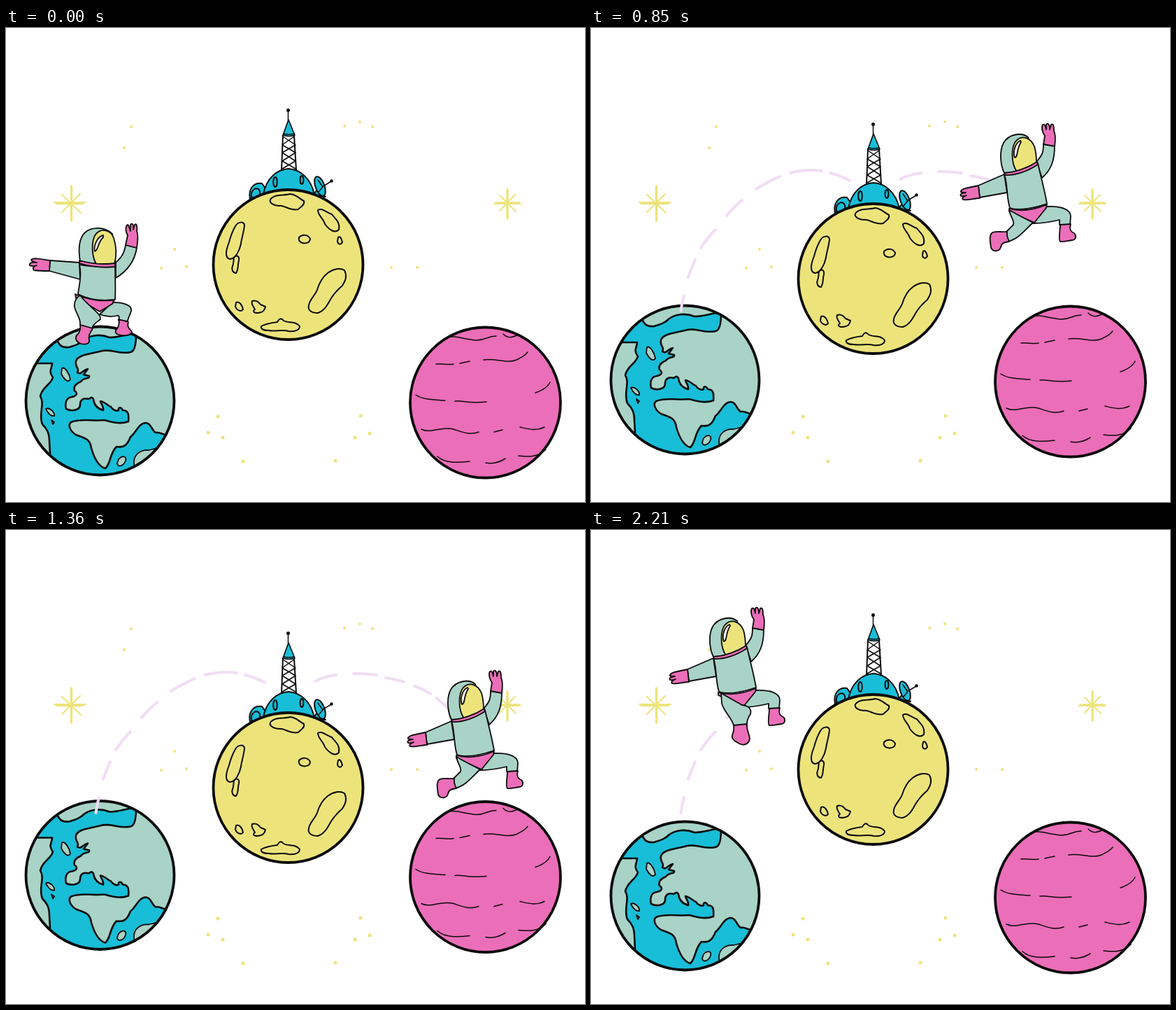
Write an HTML page that moves like this. It is 828 by 677 pixels and loops after 2.38 s.

```html
<!DOCTYPE html>
<html lang="en">
<head>
<meta charset="utf-8">
<title>Planet hopping</title>
<style>
  html, body { margin: 0; width: 100%; height: 100%; overflow: hidden; background: #fff; }
  svg {
    display: block; width: 828px; height: 677px;
    stroke: #0b0b0b; stroke-width: 2; stroke-linejoin: round; stroke-linecap: round;
  }
  .globe { stroke-width: 3.8; }
  .suit { fill: #a9d3c7; }
  .pink { fill: #eb6eb8; }
  .sun { fill: #ece47b; }
  .blue { fill: #18bdd7; }
  .white { fill: #fbf3fb; }
  .line { fill: none; }
  .thin { fill: none; stroke-width: 1.5; }
  #stars { stroke: #ece47b; fill: none; }
  #trail { stroke: #f1ddf4; stroke-width: 4; fill: none; }
  #land { stroke-width: 2.6; }
  #hero { stroke-width: 1.8; }
</style>
</head>
<body>
<svg viewBox="0 0 828 677">
  <defs><clipPath id="disc"><circle cx="134.5" cy="532.5" r="106"/></clipPath></defs>

  <g id="stars">
    <path stroke-width="3.4" d="M93.500 226V275M72 250.500H110"/>
    <path stroke-width="2" d="M80 238L107 264M106 237L80 263M69 249H114"/>
    <path stroke-width="3.4" d="M717 231V272M700 250H734"/>
    <path stroke-width="2" d="M706 239L729 262M728 238L706 261M698 251H736"/>
  </g>

  <g id="earth">
    <circle class="blue" cx="134.5" cy="532.5" r="106"/>
    <g id="land" class="suit" clip-path="url(#disc)">
      <path d="M72 444C76 452 78 457 90 456C100 453 106 451 112 445C122 438 136 437 148 442C160 442 170 438 186 436L150 410L90 420Z"/>
      <path d="M186 438C186 452 184 462 178 463C162 467 150 457 134 462C118 466 102 467 100 476C98 484 106 486 102 492C108 496 110 488 117 487L111 495L119 497C120 502 112 498 107 505C100 508 96 512 98 518C104 522 100 526 94 527C86 528 84 536 86 544C94 548 106 546 106 538C106 530 112 528 118 530C122 528 122 526 125 530C126 540 132 544 139 546C140 540 136 538 135 533C142 534 146 540 150 541C152 545 158 548 161 546C160 541 165 541 167 546C175 546 176 552 175 562C162 567 150 562 140 560C126 562 108 557 93 563C88 567 92 576 100 581C112 586 120 586 122 600C126 614 132 626 142 629C150 622 148 608 158 598C170 600 174 594 178 584C186 578 190 564 200 564C207 564 208 574 214 578C222 576 224 584 236 580L270 500L230 430Z"/>
      <path d="M40 479L66 479C66 486 60 490 67 499C64 510 52 512 49 526C56 536 46 552 52 566C58 572 62 578 62 590L63 608L10 600L10 479Z"/>
      <g stroke-width="1.8">
        <path d="M80 486C84 483 91 494 92 502C88 508 82 500 79 494Z"/>
        <path d="M57 544C62 541 70 549 69 554C64 555 60 550 57 544ZM65 560L69 563L67 566Z"/>
        <path d="M161 616C166 610 173 611 171 618C168 626 160 628 159 622Z"/>
        <path d="M183 622C182 608 194 602 204 603L224 598L215 620L185 640Z"/>
      </g>
    </g>
    <circle class="globe line" cx="134.5" cy="532.5" r="106"/>
  </g>

  <g id="rose">
    <circle class="globe pink" cx="685.5" cy="535" r="107.500"/>
    <path class="thin" d="M628 443C640 438 652 444 673 446C686 446 688 440 701 440M711 437C718 444 724 442 733 438M615 480C625 479 633 482 640 480M649 479L663 476M683 474C700 471 716 480 730 474C738 470 742 468 746 463M757 521C766 518 774 514 778 506M586 524C596 531 612 531 628 532M642 533C652 531 660 537 687 534M594 573C606 580 622 568 640 573C652 577 664 582 676 577M698 577L710 574M735 570C748 573 758 576 770 570M617 612C628 622 646 621 663 619M686 621C696 623 706 620 714 615M733 611C746 612 760 614 772 602"/>
  </g>

  <g id="moon">
    <path fill="#fff" d="M396 153L394 203H415L412 153Z"/>
    <path class="thin" d="M396 155L414 167L395 178L414 190L395 201M412 155L395 167L414 178L395 190L414 201"/>
    <path class="blue" stroke-width="1.6" d="M404 131L396 153Q405 156 413 153ZM397 151Q405 153 412 151"/>
    <path class="thin" d="M403.500 118V132"/>
    <circle cx="403.5" cy="117.500" r="1.500"/>
    <path class="blue" d="M349 244C346 230 354 220 366 222L376 236Z"/>
    <ellipse class="blue" cx="357" cy="237" rx="6" ry="8" transform="rotate(20 357 237)"/>
    <path class="blue" d="M438 240L445 231L457 241Z"/>
    <ellipse class="blue" cx="449" cy="226" rx="6.500" ry="14.500" transform="rotate(-20 449 226)"/>
    <path class="thin" d="M446 217L453 227L447 234M452 227L465 219"/>
    <circle cx="465.500" cy="218.500" r="1.300"/>
    <path class="blue" d="M368 238C372 214 388 202 404 201C420 202 436 214 441 238Z"/>
    <ellipse class="blue" cx="385" cy="220" rx="2.700" ry="7"/>
    <ellipse class="blue" cx="423" cy="217" rx="2.400" ry="6"/>
    <circle class="globe sun" cx="403.5" cy="338" r="107"/>
    <path class="line" d="M378 245C384 236 400 240 406 237C416 238 418 243 426 247C428 253 420 256 418 259C408 262 396 252 390 254C384 254 376 250 378 245ZM446 260C452 256 458 264 466 266C470 272 478 276 476 288C470 294 462 288 456 280C454 272 446 268 446 260ZM419 299C424 294 432 295 435 301C435 307 428 308 424 307C420 306 418 303 419 299ZM475 299C478 296 480 302 481 306C478 311 474 308 474 304Z"/>
    <path class="line" d="M328 283C332 276 341 276 341 282C340 292 337 300 336 308C334 318 328 330 320 330C312 328 315 316 319 306C321 298 324 290 328 283ZM326 328C330 323 334 326 333 332C331 338 333 344 329 350C324 350 322 344 324 340C326 336 325 332 326 328ZM460 350C468 344 478 342 484 346C488 354 486 360 481 368C474 374 470 378 465 386C460 394 456 404 446 407C438 407 431 404 433 396C434 388 442 382 445 374C448 364 452 356 460 350Z"/>
    <path class="line" d="M329 392C334 390 338 396 339 402C336 406 330 403 328 398ZM352 390C358 388 362 392 364 395L371 398C370 403 368 406 360 407C353 407 353 404 356 402C354 398 350 394 352 390ZM365 426C372 422 380 421 388 420C390 416 393 413 397 418C404 422 414 418 420 426C420 432 412 434 404 433C396 430 384 434 376 432C368 432 364 430 365 426Z"/>
  </g>

  <g id="trail"></g>

  <g id="hero">
    <g id="stand">
      <path class="suit" d="M152 392C166 391 181 396 179 404C177 411 174 415 174 419L161 417C163 412 161 410 158 411C150 413 142 412 134 409Z"/>
      <path class="pink" d="M161 416L175 420C172 428 178 430 180 434C179 440 168 440 161 438C155 436 156 432 159 429C162 425 162 420 161 416Z"/>
      <path class="pink" d="M99 380C118 389 140 391 155 388L152 394L134 405L112 392L100 386Z"/>
      <path class="suit" d="M106 382C99 386 96 394 99 402C103 412 107 416 106 424L123 429C124 423 130 420 135 416C137 408 118 398 106 382Z"/>
      <path class="pink" d="M106 424L124 429C120 436 117 440 119 446C120 452 110 453 105 450C98 446 99 440 103 437C106 433 107 429 106 424Z"/>
      <path class="suit" d="M63 332L105 335L106 359L62 347Z"/>
      <path class="pink" d="M63 332C54 331 40 327 36 331C36 334 42 334 44 335C38 334 33 335 34 339C37 341 42 340 44 339C40 340 37 343 40 346C48 347 55 347 62 347Z"/>
      <path class="suit" d="M171 310C169 324 163 329 157 335L157 357C174 347 184 332 187 314Z"/>
      <path class="pink" d="M171 310L174 296C170 290 171 283 174 281C176 281 176 286 178 290L178 281C180 278 183 280 182 288L184 281C187 278 188 284 187 290C190 297 188 306 187 314Z"/>
      <path class="suit" d="M106 333C103 315 105 300 113 292C124 283 142 284 152 294L156 336C138 338 118 336 106 333Z"/>
      <path class="sun" d="M129 337C122 325 122 304 128 295C136 285 150 288 154 300C158 312 158 326 155 337Q143 340 129 337Z"/>
      <path class="white" d="M139 296C130 298 125 312 127 319C132 318 131 306 139 299Z"/>
      <path class="suit" d="M105 338C109 355 104 370 103 380C118 388 138 390 156 388C157 372 156 355 156 340C138 343 118 340 105 338Z"/>
      <path class="pink" d="M105 332C122 337 140 338 156 336L156 341C138 343 118 340 105 336Z"/>
    </g>
    <g id="leap">
      <path class="suit" d="M418 198C438 197 452 202 452 212L451 224L436 224L436 217C424 220 412 222 398 222Z"/>
      <path class="pink" d="M437 224L452 223C450 231 452 234 457 236C461 240 459 246 454 246C447 247 441 249 437 248C434 246 437 232 437 224Z"/>
      <path class="pink" d="M364 201C383 206 402 202 418 195L417 200L400 221Q380 212 364 205Z"/>
      <g id="jump">
        <path class="suit" d="M368 202L398 219C407 220 412 224 410 232C405 239 405 243 405 248L386 248C384 238 370 226 369 216Z"/>
        <path class="pink" d="M386 248L405 246C404 254 409 262 409 267C408 274 402 277 396 275C390 272 382 268 384 262C386 257 387 253 386 248Z"/>
      </g>
      <g id="sit">
        <path class="suit" d="M364 206C380 208 402 206 412 211C418 216 417 224 416 233L401 236C400 232 376 231 370 224C366 217 366 211 364 206Z"/>
        <path class="pink" d="M401 236L417 233C415 242 419 246 428 250C433 255 429 259 422 258C414 260 406 258 404 252C405 246 402 242 401 236Z"/>
      </g>
      <g id="run">
        <path class="suit" d="M364 203C366 214 372 218 370 224L360 234L362 248C378 244 386 232 398 221Q380 212 364 203Z"/>
        <path class="pink" d="M361 234C352 235 344 232 339 236C335 240 337 248 338 257C342 264 350 262 352 256C353 250 357 249 364 248Q360 240 361 234Z"/>
      </g>
      <path class="suit" d="M320 168L357 152L361 178L322 185Z"/>
      <path class="pink" d="M320 168L306 171C300 172 296 174 295 176C294 178 297 178 302 178C296 179 293 180 295 183C297 184 300 183 303 182C298 184 296 186 298 188C304 190 315 186 322 186Z"/>
      <path class="suit" d="M413 109C413 120 412 124 403 134L411 157C424 146 429 132 429 111Z"/>
      <path class="pink" d="M413 109L415 97C411 92 410 84 412 81C415 79 416 84 417 88L417 81C419 78 422 80 422 88L424 81C427 79 428 83 428 90C431 96 430 105 429 112Z"/>
      <path class="suit" d="M357 150C351 138 350 118 356 107C363 95 381 91 391 99L400 140C385 146 370 150 357 150Z"/>
      <path class="sun" d="M375 148C366 135 367 112 374 104C383 95 395 100 400 112C403 122 403 130 403 136C395 142 384 146 375 148Z"/>
      <path class="white" d="M380 104C372 107 369 122 372 128C377 128 374 116 381 106Z"/>
      <path class="suit" d="M357 152C362 165 360 185 365 200C380 205 400 200 418 194C416 180 408 150 405 136C390 146 370 152 357 152Z"/>
      <path class="pink" d="M357 150C374 149 392 142 404 134L405 138C390 148 372 154 358 153Z"/>
    </g>
  </g>
</svg>
<script>
const STEP = 170;
const $ = id => document.getElementById(id);

function addPath(parent, attrs) {
  const p = document.createElementNS(parent.namespaceURI, "path");
  for (const k in attrs) p.setAttribute(k, attrs[k]);
  return parent.appendChild(p);
}

// Small stars: x, y
[[179, 141], [169, 171], [241, 316], [222, 343], [258, 341], [303, 555], [289, 578], [310, 585], [339, 619],
 [484, 140], [506, 134], [524, 141], [551, 342], [588, 342], [507, 554], [520, 579], [499, 585], [471, 618]]
  .forEach(([x, y]) => addPath($("stars"), { d: `M${x} ${y}h.1`, "stroke-width": y > 500 ? 5 : 4 }));

const dashes = [
  "M128.500 404Q130 392 133 382", "M139 356Q143 344 149 331", "M157 314Q166 300 178 288",
  "M194 268Q204 256 216 246", "M236 230Q252 220 270 212", "M285 207Q308 201 330 204",
  "M342 207Q358 211 370 218", "M442 216Q456 209 472 207", "M497 205Q514 205 530 207",
  "M543 211Q556 213 569 217", "M584 223Q596 227 607 234", "M615 240Q625 247 634 257"
].map(d => addPath($("trail"), { d }));

// Outer planets dy, moon dy, pose, hero dx, hero dy, visible dashes
const stops = [
  [0, 0, "stand", 0, 0, 0],
  [-10, 4, "jump", -182, 31, 4],
  [-14, 8, "jump", -90, 1, 5],
  [-20.5, 12, "sit", 0, 0, 7],
  [-24.5, 16, "run", 115, 1, 8],
  [-30, 20, "run", 234, 57, 10],
  [-39.5, 30, "run", 280, 121, 12],
  [-44, 34, "sit", 296, 138, 12]
];
const period = 2 * (stops.length - 1);

const move = (id, x, y) => $(id).setAttribute("transform", `translate(${x} ${y})`);
const show = (el, on) => { el.style.display = on ? "" : "none"; };

function draw(index) {
  const [outer, moon, pose, x, y, count] = stops[index];
  move("earth", 0, outer);
  move("rose", 0, outer);
  move("moon", 0, moon);
  move("hero", x, y);
  for (const id of ["stand", "jump", "sit", "run"]) show($(id), id === pose);
  show($("leap"), pose !== "stand");
  dashes.forEach((dash, i) => show(dash, i < count));
}

const start = performance.now();
let last = -1;
function tick(now) {
  const step = Math.floor(Math.max(0, now - start) / STEP) % period;
  const index = Math.min(step, period - step);
  if (index !== last) draw(last = index);
  requestAnimationFrame(tick);
}
draw(0);
requestAnimationFrame(tick);
</script>
</body>
</html>
```
